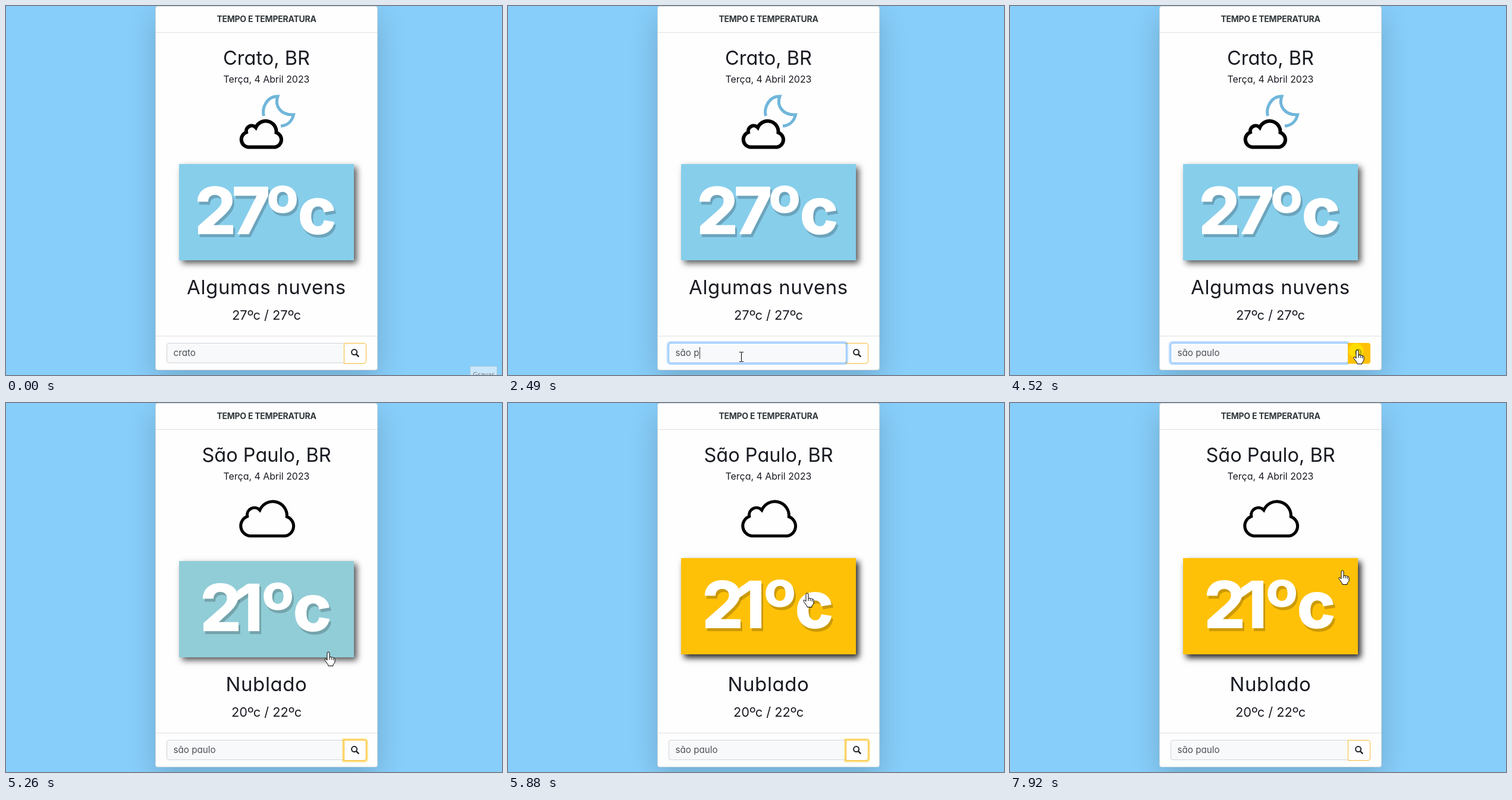
Recreate the animation shown at these times as an HTML page. Size 834 by 621 pixels, loop 7990 ms.

```html
<!DOCTYPE html>
<html lang="pt-BR">
<head>
<meta charset="utf-8">
<title>Tempo e temperatura</title>
<style>
html, body { margin: 0; width: 100%; height: 100%; overflow: hidden; background: #87cefa; }
div, svg { position: absolute; box-sizing: border-box; }
svg { left: 0; top: 0; font-family: Inter, "Open Sans", sans-serif; font-feature-settings: "cv11"; }
#card { left: 251px; top: 0; width: 374px; height: 613px; background: #fefefe; border: 1px solid #d0d8dd;
  border-radius: 4px; box-shadow: 0 16px 48px rgba(0,0,0,.175); }
#panel { left: 291px; width: 294px; height: 162px; }
.mid { text-anchor: middle; fill: #191b22; }
.big { font-size: 110px; font-weight: 800; }
</style>
</head>
<body>
<div id="card"></div>
<div id="panel"></div>
<svg width="834" height="621" viewBox="0 0 834 621">
  <defs>
    <path id="box" d="M568.5 567.5H602a3.5 3.5 0 0 1 3.5 3.5V598a3.5 3.5 0 0 1-3.5 3.5H568.5Z"/>
  </defs>
  <path d="M252 44.5H624M252 555.5H624" stroke="#dfdfdf"/>
  <text class="mid" x="438" y="27" font-size="14" font-weight="700" letter-spacing="-.25" style="fill:#30373a">TEMPO E TEMPERATURA</text>
  <text id="city" class="mid" x="438" y="98.5" font-size="32.5"></text>
  <text class="mid" x="438" y="129" font-size="15.9">Terça, 4 Abril 2023</text>
  <path id="moon" d="M433.5 185C430 172 438 152 457 152C451 168 462 184 483.5 183C481 194 473 201 462 202" fill="none" stroke="#70b6da" stroke-width="5"/>
  <path id="cloud" d="M407 237.5A13 13 0 0 1 404 212.5A9.3 9.3 0 0 1 420 204.5A18 18 0 0 1 454.5 213A12.7 12.7 0 0 1 452.5 237.5Z" fill="#fefefe" stroke="#000"/>
  <g id="temp" class="mid big">
    <text id="tempShade" fill="#000" fill-opacity=".2" transform="translate(3 5)"></text>
    <text id="tempText" fill="#fff"></text>
  </g>
  <text id="sky" class="mid" x="438" y="485" font-size="33" letter-spacing=".6"></text>
  <text id="range" class="mid" x="438" y="528" font-size="21.8"></text>

  <path d="M569 567.5H274a3.5 3.5 0 0 0-3.5 3.5V597a3.5 3.5 0 0 0 3.5 3.5H569" fill="#f8f9fa" stroke="#ced4da"/>
  <use href="#box" fill="#fff" stroke="#f5bb35"/>
  <g id="inputFocus" fill="none">
    <rect x="268.5" y="565.5" width="302" height="37" rx="5" stroke="#007bff" stroke-opacity=".27" stroke-width="3.2"/>
    <rect x="270.5" y="567.5" width="298" height="33" rx="3.5" stroke="#80bdff"/>
  </g>
  <use id="buttonHover" href="#box" fill="#ffc107" stroke="#ffc107"/>
  <path id="buttonFocus" d="M567 566H603a4 4 0 0 1 4 4V599a4 4 0 0 1-4 4H567Z" fill="none" stroke="#ffc107" stroke-opacity=".5" stroke-width="3.2"/>
  <g fill="none" stroke="#212529">
    <circle cx="585.6" cy="582.6" r="4.5" stroke-width="2"/>
    <path d="M588.8 585.8L593.3 590.3" stroke-width="2.6"/>
  </g>
  <rect id="selection" x="282" y="574" width="38" height="21" fill="#0078d7"/>
  <text id="query" x="281.5" y="589" font-size="15.2" xml:space="preserve"></text>
  <rect id="caret" y="574" width="1" height="20" fill="#343a40"/>

  <g id="tip">
    <rect x="780.5" y="606.5" width="45" height="20" fill="#cbe7fb" stroke="#aac8dc"/>
    <text x="785" y="624" font-family="'Open Sans', sans-serif" font-size="11.5" fill="#70777d">Gravar</text>
  </g>
  <circle id="click" r="12.5" fill="#ffee00" fill-opacity=".6"/>
  <g id="cursor" stroke="#000" fill="#fff" stroke-linejoin="round">
    <path id="arrow" d="M0 0V16L4 12.5L6.5 18L9 17L6.5 11.5H11.5Z"/>
    <path id="beam" d="M-3 -7.5H0L.5 -7L1 -7.5H4M-3 8.5H0L.5 8L1 8.5H4M.5 -7V8" fill="none"/>
    <path id="hand" d="M-2 1Q-2 -1 0 -1T2 1V8Q4 6.5 5.5 8Q7.5 7 8.5 9Q11 8.5 11 11V16Q10 19 8 20V22.5H0Q0 20 -3 17L-6 12.5Q-6.5 9.5 -4 11L-2 13ZM2 8V12M5.3 8.5V12M8.3 9.5V13"/>
  </g>
</svg>
<script>
const LOOP = 7990;
const $ = id => document.getElementById(id);
const show = (id, on) => $(id).style.display = on ? '' : 'none';
const fade = (id, v) => $(id).style.opacity = v;
const ramp = (t, a, b) => Math.min(1, Math.max(0, (t - a) / (b - a)));
const mix = (a, b, p) => a + (b - a) * p;
const within = (t, a, b) => t >= a && t < b;
const put = (id, text) => { if ($(id).textContent !== text) $(id).textContent = text; };

// time, x, y of the pointer's hot spot
const path = [
  [70, 803, 618], [200, 770, 612], [450, 570, 598], [700, 420, 590], [820, 392, 590],
  [3830, 392, 590], [4030, 450, 573], [4230, 540, 560], [4400, 584, 580], [4870, 584, 580],
  [5050, 574, 530], [5230, 545, 428], [5530, 520, 353], [5670, 507, 338], [6000, 500, 312],
  [6430, 513, 290], [6630, 548, 286], [7260, 548, 286], [7520, 559, 283]
];
const clicks = [[820, 1010], [4450, 4660], [6850, 6990], [7850, 7915]];
const keys = [1360, 1960, 2100, 2290, 2490, 2590, 2690, 2890, 3090];
const places = [
  { city: 'Crato, BR', temp: '27ºc', xs: '352 412 465 523', sky: 'Algumas nuvens', range: '27ºc / 27ºc' },
  { city: 'São Paulo, BR', temp: '21ºc', xs: '361 408 457 515', sky: 'Nublado', range: '20ºc / 22ºc' }
];

function pointer(t) {
  const i = path.findIndex(k => k[0] > t);
  if (i < 0) return path.at(-1).slice(1);
  if (i === 0) return path[0].slice(1);
  const [a, b] = [path[i - 1], path[i]], p = ramp(t, a[0], b[0]);
  return [mix(a[1], b[1], p), mix(a[2], b[2], p)];
}

function drawWeather(t) {
  const loaded = t >= 4870, place = places[+loaded];
  for (const id of ['city', 'sky', 'range']) put(id, place[id]);
  for (const id of ['tempShade', 'tempText']) {
    put(id, place.temp);
    $(id).setAttribute('x', place.xs);
  }
  show('moon', !loaded);
  $('cloud').setAttribute('transform', loaded ? 'translate(440 194.5) scale(1.32) translate(-430 -215.3)' : '');
  $('cloud').setAttribute('stroke-width', loaded ? 3.8 : 6);

  // the panel lifts and turns amber under the pointer
  const hover = 1 - (1 - ramp(t, 5230, 5930)) ** 2;
  const top = mix(266, 261, hover), drop = mix(5, 6, hover);
  const style = $('panel').style;
  style.top = top + 'px';
  style.background = `rgb(${mix(135, 255, hover)},${mix(206, 193, hover)},${mix(235, 7, hover)})`;
  style.boxShadow = `5px ${drop}px 10px rgba(0,0,0,${mix(.65, .85, hover)})`;
  $('temp').setAttribute('transform', `translate(0 ${top + 118})`);
}

function drawSearch(t) {
  const typed = keys.filter(k => k <= t).length;
  const selected = within(t, 980, 1360);
  put('query', typed ? 'são paulo'.slice(0, typed) : 'crato');
  $('query').setAttribute('fill', selected ? '#fff' : '#495057');
  show('selection', selected);
  show('caret', within(t, 1360, 3620));
  $('caret').setAttribute('x', Math.round(281.5 + $('query').getComputedTextLength()));
  fade('inputFocus', ramp(t, 820, 1000) - ramp(t, 4590, 4730));
  fade('buttonFocus', ramp(t, 4590, 4730) - ramp(t, 6850, 6990));
  fade('buttonHover', ramp(t, 4360, 4500) - ramp(t, 4940, 5090));
}

function drawPointer(t) {
  const [x, y] = pointer(t);
  const inside = (left, top, right, bottom) => x >= left && x < right && y >= top && y <= bottom;
  const kind = inside(270, 567, 568, 601) ? 'beam'
    : inside(568, 567, 606, 602) || inside(291, 262, 585, 428) ? 'hand' : 'arrow';
  for (const id of ['arrow', 'beam', 'hand']) show(id, id === kind);
  show('cursor', t >= 70);
  $('cursor').setAttribute('transform', `translate(${Math.round(x)} ${Math.round(y)})`);
  show('click', clicks.some(([a, b]) => within(t, a, b)));
  $('click').setAttribute('transform', `translate(${x - 2} ${y})`);
  show('tip', t < 200);
}

function frame() {
  const t = performance.now() % LOOP;
  drawWeather(t);
  drawSearch(t);
  drawPointer(t);
  requestAnimationFrame(frame);
}
frame();
</script>
</body>
</html>
```
